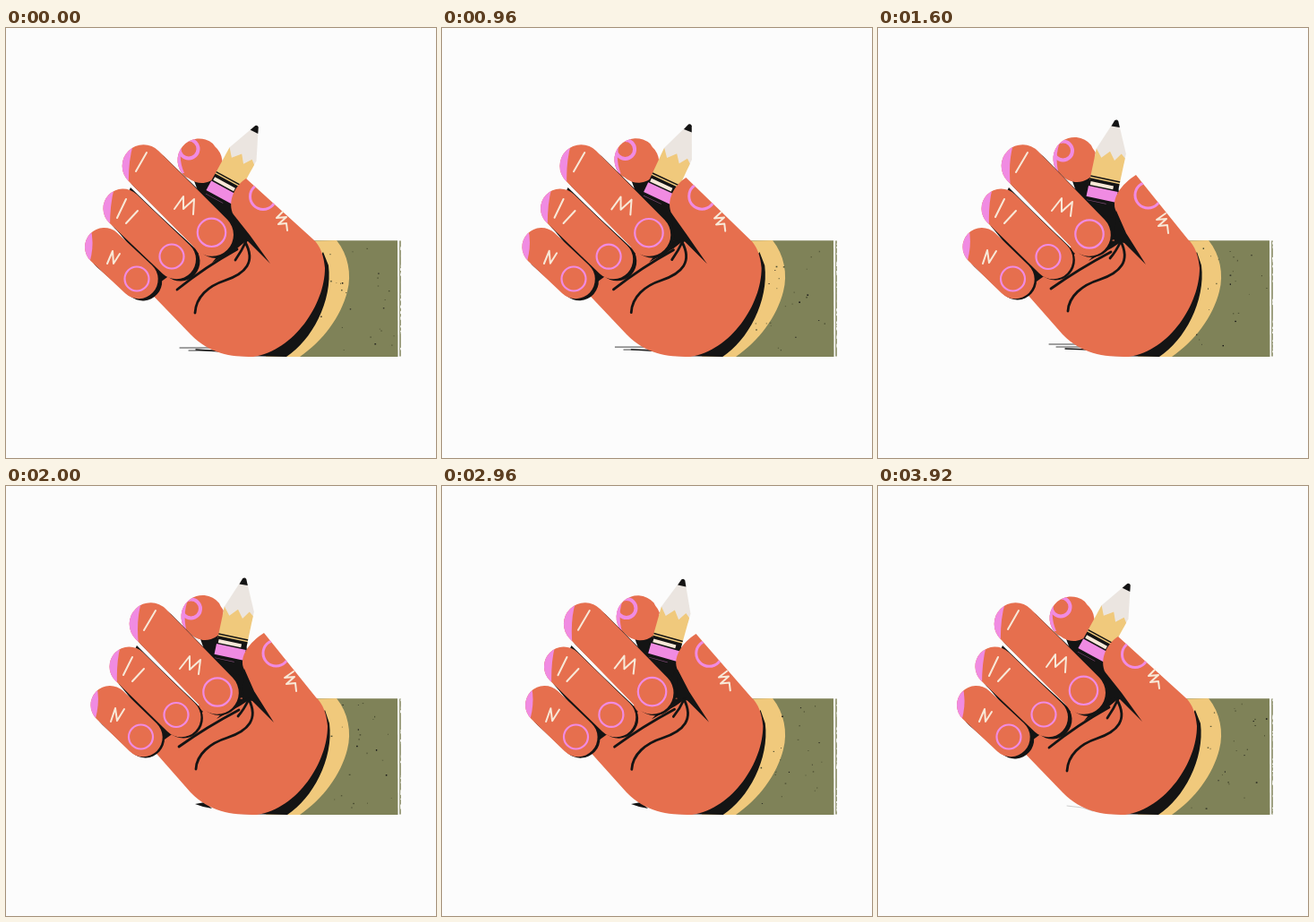
Write an HTML page with a canvas that moves like this. It is 480 by 480 pixels and loops after 4 s.

```html
<!DOCTYPE html>
<html lang="en">
<head>
<meta charset="utf-8">
<title>Hand with pencil</title>
<style>
html, body { margin: 0; width: 100%; height: 100%; overflow: hidden; background: #fcfcfc; }
canvas { display: block; width: 480px; height: 480px; }
</style>
</head>
<body>
<canvas id="stage" width="480" height="480"></canvas>
<script>
const ctx = document.getElementById('stage').getContext('2d');
const LOOP = 4000, STEP = 80;
const PAPER = '#fcfcfc', SKIN = '#e66f4e', INK = '#141414', PINK = '#f08be2',
      CREAM = '#f8e9d8', YELLOW = '#f0c97c', OLIVE = '#7f8258', WOOD = '#ebe5e0';
let grip = 0; // 0 = pencil leaning right, 1 = pencil upright

const mix = (a, b) => a + (b - a) * grip;

// Blends two path strings that share the same commands.
function morph(a, b = a) {
  const ends = b.match(/-?[\d.]+/g);
  let i = 0;
  return new Path2D(a.replace(/-?[\d.]+/g, v => mix(+v, +ends[i++])));
}

function fill(color, path) {
  ctx.fillStyle = color;
  ctx.fill(path);
}

function stroke(color, width, path) {
  ctx.strokeStyle = color;
  ctx.lineWidth = width;
  ctx.stroke(path);
}

function ring(x, y, r, width = 2.2) {
  const path = new Path2D();
  path.arc(x, y, r, 0, 7);
  stroke(PINK, width, path);
}

function inside(path, draw) {
  ctx.save();
  ctx.clip(path);
  draw();
  ctx.restore();
}

function random(seed) {
  return () => {
    seed = (seed * 16807) % 2147483647;
    return seed / 2147483647;
  };
}

// Rounded bar with a different radius at each end.
function capsule(x1, y1, r1, x2, y2, r2) {
  const along = Math.atan2(y2 - y1, x2 - x1), q = Math.PI / 2;
  const path = new Path2D();
  path.arc(x1, y1, r1, along + q, along + 3 * q);
  path.arc(x2, y2, r2, along - q, along + q);
  path.closePath();
  return path;
}

function finger(tip, end, nail, knuckle, marks) {
  const [x1, y1, r1, dx1] = tip, [x2, y2, r2, dx2] = end;
  const a = x1 + dx1 * grip, b = x2 + dx2 * grip, gap = mix(4.5, 2.4);
  fill(INK, capsule(a + 6, y1 + 6, r1, b + gap, y2 + gap * 0.5, r2));
  const body = capsule(a, y1, r1, b, y2, r2);
  fill(SKIN, body);
  inside(body, () => fill(PINK, nail));
  ring(...knuckle);
  stroke(CREAM, 2, marks);
}

function sleeve(rand) {
  fill(OLIVE, new Path2D('M325 237.3 L437 237.3 L437.5 367 L312 367Z'));
  stroke(OLIVE, 1.5, new Path2D('M440 238 L440 366'));
  fill(YELLOW, new Path2D('M330 238 L369 237 C382 253 386 275 381 294 C374 322 354 349 328 367 L290 367Z'));
  for (let i = 0; i < 26; i++) {
    ctx.fillStyle = i % 4 ? '#4a4d31' : INK;
    ctx.fillRect(348 + rand() * 86, 242 + rand() * 118, 0.6 + rand() * 1.2, 0.6 + rand());
  }
  ctx.fillStyle = PAPER;
  for (let i = 0; i < 30; i++) {
    ctx.fillRect(440 + rand(), 238 + rand() * 128, 1.2, 1 + rand() * 2);
  }
}

function groundShadow(t) {
  if (t < 2000) {
    stroke(INK, 0.8, morph('M194 357 L232 357 M204 360 L240 360', 'M191 353 L224 353 M199 356 L230 356'));
    stroke(INK, 1.3, morph('M212 359 L240 361', 'M209 358 L236 359'));
  } else if (t < 3100) {
    fill(INK, new Path2D('M211 355 L222 353 L230 360 L220 358Z'));
  } else {
    stroke('#8886', 1, new Path2D('M211 357 L228 359 L240 363'));
  }
}

function backFinger() {
  const body = capsule(mix(215.5, 219.5), mix(147.5, 146), 24, mix(218.5, 222), mix(150, 149), 23);
  fill(SKIN, body);
  inside(body, () => {
    fill(PINK, morph('M188 128 L198 126 C193 138 194 151 199 162 L188 162Z',
                     'M192 122 L205 122 C199 136 198 148 202 164 L192 164Z'));
    ring(mix(204, 206.5), mix(135, 137), 10.5, 4);
  });
}

function pencil() {
  ctx.save();
  ctx.translate(mix(280.5, 266.5), mix(109, 102.5));
  ctx.rotate(mix(28.7, 12) * Math.PI / 180);
  const bar = (color, y, h, x = -15.5, w = 33.5) => {
    ctx.fillStyle = color;
    ctx.fillRect(x, y, w, h);
  };
  fill(WOOD, new Path2D('M-2 1 Q0 -1 2 1 L18 35 L18 46 L-15.5 46 L-15.5 36Z'));
  fill(YELLOW, new Path2D('M-15.5 36 L-8 45 L0 36 L7 45 L13 36 L18 40 L18 72 L-15.5 72Z'));
  fill(INK, new Path2D('M-2 1 Q0 -1 2 1 L5 7.5 L-4.5 8Z'));
  bar(INK, 66.5, 1.5);
  bar(INK, 69.5, 38);
  bar(CREAM, 73, 4, -14, 26);
  bar(PINK, 78.5, 12);
  bar('#7d4875', 94, 0.6, -14, 22);
  ctx.restore();
}

function palm() {
  fill(INK, morph('M260 366 L313 367 C341 349 365 305 360 265 L354 250 L320 300Z',
                  'M260 366 L314 367 C342 349 366 305 361 265 L356 250 L320 300Z'));
  fill(SKIN, morph(
    'M150 284 L206 342 C228 364 250 367 276 367 C322 360 356 308 356 268 C355 255 351 243 343 236 L268 168 C254 177 247 195 254 209 L262 238 L225 235Z',
    'M155 284 L206 342 C228 364 250 367 280 367 C326 360 359 308 359 268 C358 255 354 243 346 236 L288 164 C272 174 259 191 266 205 L274 237 L230 235Z'));
  const edge = morph('M268 168 L343 236 L320 260 L230 240 L240 160Z', 'M288 164 L346 236 L320 260 L240 240 L255 160Z');
  inside(edge, () => ring(mix(287, 301.5), mix(188, 186.5), 14.5, 3));
  stroke(CREAM, 2, morph('M309 205 L302 212 L313 211 L304 219 L313 218 L314 226',
                         'M321 207 L311 214 L322 213 L313 221 L323 220 L324 229'));
}

function creases() {
  fill(INK, morph('M253 207 L272 231 L295 263 L270 238 L258 240Z',
                  'M266 204 L277 229 L299 264 L275 240 L264 238Z'));
  stroke(INK, 2.8, morph('M191 292 Q222 267 258 247 M268 238 Q263 249 256 259',
                         'M193 291 Q224 269 260 250 M271 238 Q266 249 259 257'));
  stroke(INK, 2.8, morph('M211 318 C212 300 226 288 244 282 C268 274 279 261 267 239',
                         'M212 316 C213 299 228 287 247 281 C271 273 282 260 271 238'));
  fill(INK, morph('M240 250 L252 238 L270 236 L258 246 L230 262Z',
                  'M245 250 L256 238 L274 237 L262 245 L235 260Z'));
}

function fingers() {
  fill(INK, morph('M139 178 L215 252 L172 284 L120 221Z', 'M146 178 L220 252 L177 283 L126 221Z'));
  finger([109.5, 244.5, 21.5, 6.5], [148, 280.5, 21.7, 5],
    morph('M85 222 L94 222 Q100 242 92 266 L85 266Z', 'M90 222 L101 222 Q106 242 98 266 L90 266Z'),
    [mix(146, 150.5), 280, 13.5],
    morph('M113 263 L119 249 L120 263 L127 252', 'M117 263 L122 248 L124 262 L132 249'));
  finger([130.5, 201.5, 22, 7], [190, 258.3, 22, 5.5],
    morph('M105 178 L121 178 Q116 196 116 222 L105 222Z', 'M110 178 L128 178 Q123 196 124 222 L110 222Z'),
    [mix(185, 190), mix(255, 255.5), 13.5],
    morph('M134 191 L124 212 M147 204 L134 218', 'M141 191 L131 211 M154 204 L141 218'));
  finger([153.5, 154, 23.8, 8], [230, 230.8, 24, 5.8],
    morph('M125 130 L142 130 Q136 150 137 178 L125 178Z', 'M130 130 L151 130 Q145 150 148 178 L130 178Z'),
    [mix(229.5, 236), mix(228.3, 230), 15.7],
    morph('M157 139 L145 160 M188 202 L198 188 L198 202 L210 191 L209 208',
          'M167 139 L154 161 M194 204 L205 190 L205 205 L217 194 L215 210'));
}

function draw(t) {
  // Both swings are centred 1000 ms either side of the held pose.
  grip = 1 / (1 + Math.exp((Math.abs(t - 2060) - 1000) / 80));
  ctx.fillStyle = PAPER;
  ctx.fillRect(0, 0, 480, 480);
  sleeve(random(4711 + t * 31));
  groundShadow(t);
  fill(INK, morph('M209 168 L236 154 L262 175 L270 238 L240 250Z',
                  'M216 168 L240 150 L268 178 L280 238 L245 250Z'));
  backFinger();
  pencil();
  palm();
  creases();
  fingers();
}

ctx.lineCap = ctx.lineJoin = 'round';
function tick(now) {
  draw(Math.floor((now % LOOP) / STEP) * STEP);
  requestAnimationFrame(tick);
}
draw(0);
requestAnimationFrame(tick);
</script>
</body>
</html>
```
